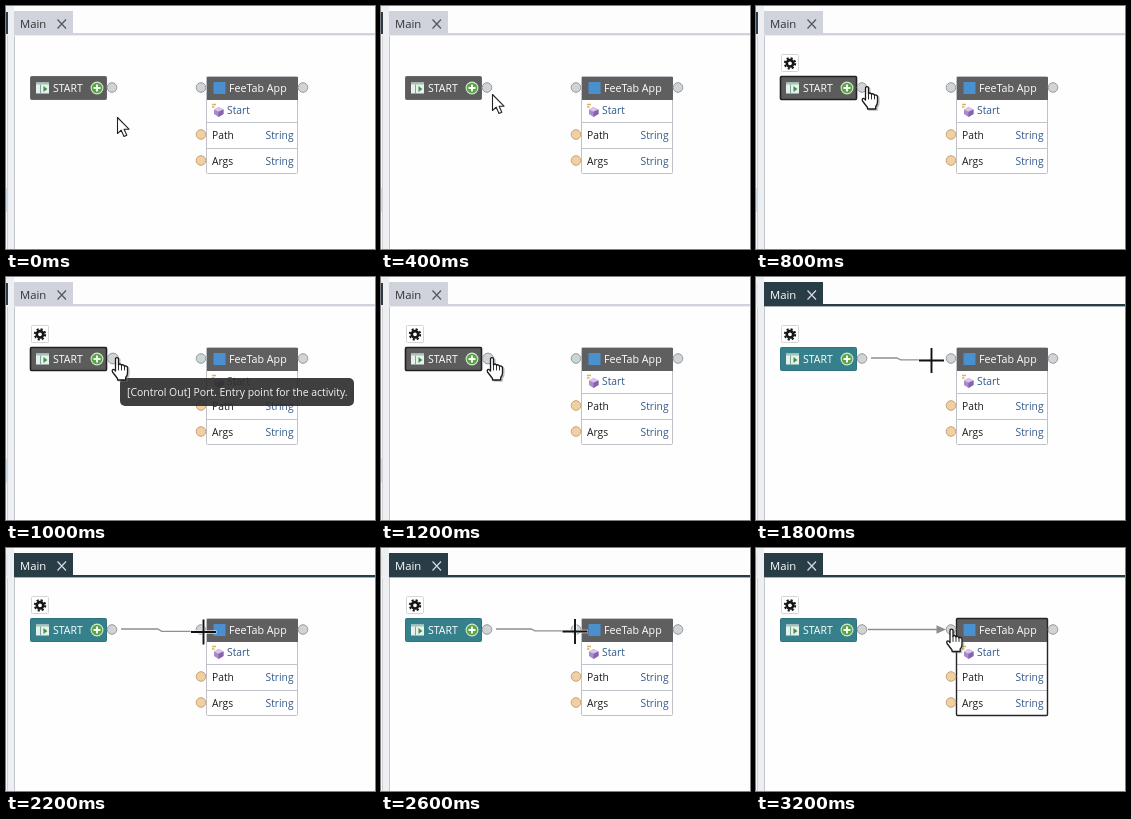
Animation of 369x243 px, one loop 3.6 s. Source, as an HTML page:

```html
<!DOCTYPE html>
<html lang="en">
<head>
<meta charset="utf-8">
<title>Connecting two blocks</title>
<style>
html, body { margin: 0; width: 100%; height: 100%; overflow: hidden; background: #eeeff2; }
svg { display: block; width: 369px; height: 243px; }
text { font: 10.5px "Open Sans", "Noto Sans", sans-serif; }
.type { font-size: 10.3px; fill: #31588a; }
.name { font-size: 10.3px; fill: #1c1c1c; }
.port { fill: #d1d4d7; stroke: #96999c; }
.arg { fill: #f0d0a2; stroke: #c6a374; }
</style>
</head>
<body>
<svg viewBox="0 0 369 243" xmlns="http://www.w3.org/2000/svg">
  <rect width="369" height="243" fill="#eeeff2"/>
  <rect x="8" width="361" height="28" fill="#fdfdfd"/>

  <!-- side panel edge -->
  <rect y="30" width="1.5" height="213" fill="#f7f7f9"/>
  <rect id="sideTab" y="6" width="2" height="22"/>
  <rect id="sideItem" y="182" width="1.5" height="24" fill="#cfe0ea"/>
  <path d="M1.5 30V243" stroke="#d0d2da"/>

  <!-- tab and canvas -->
  <rect x="8" y="29" width="361" height="214" fill="#fefefe"/>
  <path d="M8.5 30V243" stroke="#c3c5cd"/>
  <g id="tab">
    <rect x="8" y="5" width="59" height="23"/>
    <rect x="8" y="27" width="361" height="2.4"/>
  </g>
  <g id="tabInk">
    <text x="14" y="22" style="font-size:11.3px">Main</text>
    <path id="close" d="M51.5 13.5l8.5 9M60 13.5l-8.5 9" stroke-width="1.2"/>
  </g>

  <!-- start block -->
  <g id="gear">
    <rect x="25.5" y="48.5" width="17" height="17" rx="1" fill="#fff" stroke="#d3d5d8"/>
    <circle cx="34" cy="57.3" r="3.2" fill="none" stroke="#151515" stroke-width="2.6"/>
    <circle cx="34" cy="57.3" r="5.2" fill="none" stroke="#151515" stroke-width="2" stroke-dasharray="2.1 1.984"/>
  </g>
  <rect id="start" x="24.5" y="70.5" width="76" height="23" rx="1"/>
  <g>
    <rect x="30" y="76.5" width="13" height="11" fill="#e6f0ec"/>
    <path d="M30 77.5H43" stroke="#a5c3b6" stroke-width="2"/>
    <path d="M34.5 78.5V87.5" stroke="#7fa799"/>
    <path d="M37.5 80l3.8 3l-3.8 3z" fill="#39913f"/>
  </g>
  <text x="47" y="86" fill="#fff">START</text>
  <circle cx="91" cy="82" r="5.9" fill="#58a548" stroke="#d5ebcd" stroke-width="1.1"/>
  <path d="M87.5 82h7M91 78.5v7" stroke="#fff" stroke-width="1.8"/>
  <circle class="port" id="outPort" cy="81.5"/>

  <!-- app block -->
  <rect x="200.5" y="70.5" width="91" height="97" rx="1" fill="#fff" stroke="#c0c1c8"/>
  <rect x="201" y="71" width="91" height="23" fill="#5f5f5f"/>
  <path d="M201 116.5H292M201 142.5H292" stroke="#c2c4cc"/>
  <rect x="207.5" y="76" width="12" height="12" fill="#4a90cf"/>
  <text x="223" y="86" fill="#fff" style="font-size:10.7px">FeeTab App</text>
  <g>
    <path d="M212.5 101l5 2.5v4.5l-5 3l-4.500-3v-4.500z" fill="#a98acb"/>
    <path d="M212.500 101l5 2.500l-5 2.300l-4.500-2.300z" fill="#d9c4ea"/>
    <path d="M212.500 105.800v5.200l5-3v-4.500z" fill="#8663b0"/>
    <path d="M206 98.500h4M206 101h2.500" stroke="#d9b45c" stroke-width="1.300"/>
  </g>
  <text class="type" x="221" y="108">Start</text>
  <text class="name" x="206" y="133">Path</text>
  <text class="name" x="206" y="159">Args</text>
  <text class="type" x="259.500" y="133">String</text>
  <text class="type" x="259.500" y="159">String</text>
  <rect id="picked" x="200.500" y="70.500" width="91" height="97" rx="1" fill="none" stroke="#252525" stroke-width="1.400"/>
  <circle class="port" id="inPort" cx="195" cy="81.500" r="4.800"/>
  <circle class="port" cx="297" cy="81.500" r="4.800"/>
  <circle class="arg" cx="195" cy="128.500" r="4.800"/>
  <circle class="arg" cx="195" cy="154.500" r="4.800"/>

  <!-- connection -->
  <path id="wire" fill="none" stroke="#8d8e98" stroke-width="1.300"/>
  <path id="head" d="M180.500 77.300L190 81.500L180.500 85.700z" fill="#8d8e92"/>

  <g id="tip">
    <rect x="114" y="101" width="234" height="28" rx="5" fill="#2c2d2e" fill-opacity=".91"/>
    <text x="121" y="119" fill="#f4f4f4" style="font-size:10.450px">[Control Out] Port. Entry point for the activity.</text>
  </g>

  <!-- pointers -->
  <g id="arrow" stroke-linejoin="round">
    <path d="M.5 .5V16.500L4.200 13.200L7 19.500L9.800 18.200L7.100 12.200H12z" fill="#fff" stroke="#222" stroke-width="1.100"/>
  </g>
  <g id="hand" stroke-linejoin="round" stroke-linecap="round" stroke="#1a1a1a" stroke-width="1.300">
    <path id="palm" d="M4 14V2.200Q4 .6 5.500 .6T7 2.200V8Q7.300 6.800 8.600 7T10 8.500Q10.300 7.500 11.600 7.800T13 9.500Q13.400 8.700 14.700 9.100T16 10.800V16Q16 18.500 14.200 20.500V23H6V21.500L1 15Q.2 13.300 1.300 12.600T4 14z" fill="#fff"/>
    <path d="M7 8V13M10 8.500V13M13 9.500V13" fill="none" stroke-width=".9"/>
  </g>
  <g id="cross" fill="none">
    <path d="M-13 0H13M0-13V13" stroke="#fff" stroke-width="3.600" stroke-opacity=".75"/>
    <path d="M-12.500 0H12.500M0-12.500V12.500" stroke="#111" stroke-width="1.900"/>
  </g>
</svg>
<script>
const LOOP = 3600;
const $ = id => document.getElementById(id);
const set = (id, attrs) => {
  for (const key in attrs) $(id).setAttribute(key, attrs[key]);
};
const show = (id, on) => set(id, { visibility: on ? "visible" : "hidden" });

// start time, pointer shape, x, y
const moves = [
  [0, "arrow", 111, 111],
  [400, "arrow", 111, 88],
  [800, "hand", 105.5, 80],
  [1400, "hand", 121.5, 80],
  [1600, "cross", 166, 82],
  [1800, "cross", 175.5, 83.5],
  [2000, "cross", 189.5, 84],
  [2200, "cross", 197.5, 84],
  [2600, "cross", 194, 83.5],
  [2800, "cross", 199, 81.5],
  [3000, "hand", 190, 80.5]
];

// soft shadow under the hand
const shadow = $("palm").cloneNode();
shadow.removeAttribute("id");
for (const [key, value] of [["fill", "#777"], ["stroke", "#777"], ["opacity", ".45"], ["transform", "translate(1.5 1)"]]) {
  shadow.setAttribute(key, value);
}
$("hand").prepend(shadow);

function wirePath(x, y) {
  const mid = (112 + x) / 2;
  return `M115 81H${mid - 3}L${mid + 1} ${y - 0.7}H${x}`;
}

function draw(t) {
  const [, shape, x, y] = moves.findLast(m => m[0] <= t);
  for (const id of ["arrow", "hand", "cross"]) show(id, id === shape);
  set(shape, { transform: `translate(${x} ${y})` });

  const active = t >= 1400;
  const linked = t >= 3000;
  const outlined = t >= 600 && !active;
  const hover = t >= 1000 && t < 1600;

  set("sideTab", { fill: active ? "#e6e8ec" : "#2b3c48" });
  show("sideItem", !active);
  set("tab", { fill: active ? "#283d45" : "#d0d2dc" });
  set("tabInk", { fill: active ? "#fff" : "#333" });
  set("close", { stroke: active ? "#d5dbe0" : "#555" });
  set("start", {
    fill: active ? "#36808b" : "#5c5c5c",
    stroke: outlined ? "#202020" : active ? "#2f737d" : "#666",
    "stroke-width": outlined ? 1.6 : 1
  });
  set("outPort", { cx: hover ? 107 : 106, r: hover ? 5.4 : 4.8 });
  set("inPort", { style: hover ? "fill:#c9d6d6" : "" });

  show("gear", t >= 600);
  show("tip", t >= 1000 && t < 1200);
  show("picked", t >= 3200);
  show("wire", t >= 1600);
  show("head", linked);
  set("wire", { d: linked ? "M112 81.5H182" : wirePath(x, y) });
}

function tick() {
  draw(performance.now() % LOOP);
  requestAnimationFrame(tick);
}
tick();
</script>
</body>
</html>
```
